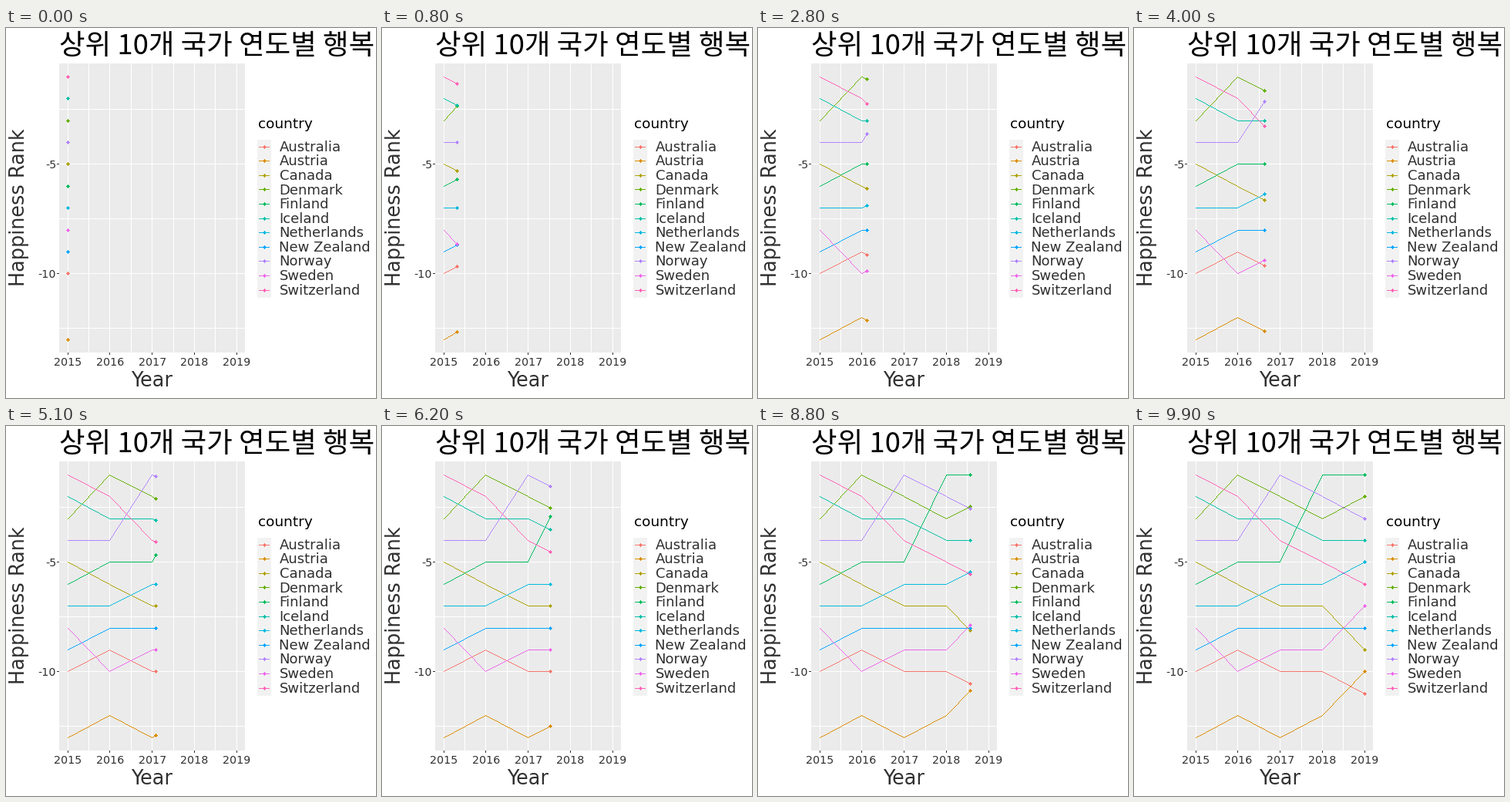
Recreate the animation shown at these times as a matplotlib script. Size 480 px wide and 480 px high, loop 10000 ms.

```python
import matplotlib.pyplot as plt
import numpy as np
from matplotlib.animation import FuncAnimation
from matplotlib.colors import to_rgb

SIZE, DPI = 480, 100
FRAMES = 100
INK = "#303030"

RANKS = {
    "Australia": ("#F8766D", (10, 9, 10, 10, 11)),
    "Austria": ("#DB8E00", (13, 12, 13, 12, 10)),
    "Canada": ("#AEA200", (5, 6, 7, 7, 9)),
    "Denmark": ("#64B200", (3, 1, 2, 3, 2)),
    "Finland": ("#00BD5C", (6, 5, 5, 1, 1)),
    "Iceland": ("#00C1A7", (2, 3, 3, 4, 4)),
    "Netherlands": ("#00BADE", (7, 7, 6, 6, 5)),
    "New Zealand": ("#00A6FF", (9, 8, 8, 8, 8)),
    "Norway": ("#B385FF", (4, 4, 1, 2, 3)),
    "Sweden": ("#EF67EB", (8, 10, 9, 9, 7)),
    "Switzerland": ("#FF63B6", (1, 2, 4, 5, 6)),
}
YEARS = np.arange(5)
# frame on which the dots reach each year
ARRIVALS = np.round(YEARS * (FRAMES - 1) / 4 + 1) - 1

fig = plt.figure(figsize=(SIZE / DPI, SIZE / DPI), dpi=DPI, facecolor="white")
ax = fig.add_axes([0, 0, 1, 1])
ax.axis("off")


def year_x(t):
    return 80.2 + 54.74 * np.asarray(t)


def rank_y(r):
    return 63.35 + 28.39 * (np.asarray(r) - 1)


# hard-edged shapes are painted straight onto the pixel canvas
def box(img, x, y, w, h, color):
    x, y = int(x), int(y)
    img[y:y + h, x:x + w] = to_rgb(color)


def trail(img, xs, ys, color):
    xs, ys = np.floor(xs), np.floor(ys)
    for x0, y0, x1, y1 in zip(xs, ys, xs[1:], ys[1:]):
        n = int(max(abs(x1 - x0), abs(y1 - y0))) + 1
        cols = np.linspace(x0, x1, n).round().astype(int)
        rows = np.linspace(y0, y1, n).round().astype(int)
        img[rows, cols] = to_rgb(color)


def dot(img, x, y, color):
    for d in range(-2, 3):
        half = 2 - abs(d)
        box(img, int(x) - half, int(y) + d, 2 * half + 1, 1, color)


def write(text, x, y, px, color=INK, ha="left", font="DejaVu Sans", angle=0):
    ax.text(x, y, text, fontsize=px * 72 / DPI, color=color, family=font, ha=ha,
            va="baseline", rotation=angle, rotation_mode="anchor")


# panel, grid and axes
base = np.ones((SIZE, SIZE, 3))
box(base, 69, 46, 241, 375, "#EBEBEB")
for t in np.arange(0, 4.5, 0.5):
    box(base, year_x(t), 46, 1, 375, "white")
for r in np.arange(2.5, 13, 2.5):
    box(base, 69, rank_y(r), 241, 1, "white")
for t in YEARS:
    box(base, year_x(t), 421, 1, 3, "#333333")
    write(str(2015 + t), year_x(t), 438, 14.3, ha="center")
for r in (5, 10):
    box(base, 66, rank_y(r), 3, 1, "#333333")
    write(f"-{r}", 65, rank_y(r) + 5, 14.3, ha="right")
write("Year", 189.5, 465, 25.5, ha="center")
write("Happiness Rank", 24, 233, 25.5, ha="center", angle=90)
write("상위 10개 국가 연도별 행복", 69, 34, 36.5, "black", font="Noto Sans CJK JP")

# legend
write("country", 327, 130.5, 18.5, "black")
box(base, 326, 145, 18, 205, "#F2F2F2")
for i, (name, (color, _)) in enumerate(RANKS.items()):
    y = 154 + 18.6 * i
    box(base, 328, y, 14, 1, color)
    dot(base, 335, y, color)
    write(name, 354.5, y + 5.7, 18)

canvas = ax.imshow(base, extent=(0, SIZE, SIZE, 0), interpolation="nearest",
                   aspect="auto", zorder=0)
ax.set(xlim=(0, SIZE), ylim=(SIZE, 0))


def draw(frame):
    now = np.interp(frame, ARRIVALS, YEARS)
    times = np.append(YEARS[YEARS < now], now)
    img = base.copy()
    paths = [(year_x(times), rank_y(np.interp(times, YEARS, ranks)), color)
             for color, ranks in RANKS.values()]
    for xs, ys, color in paths:
        trail(img, xs, ys, color)
    for xs, ys, color in paths:
        dot(img, xs[-1], ys[-1], color)
    canvas.set_data(img)
    return [canvas]


anim = FuncAnimation(fig, draw, frames=FRAMES, interval=100, repeat=True, repeat_delay=0)
plt.show()
```
